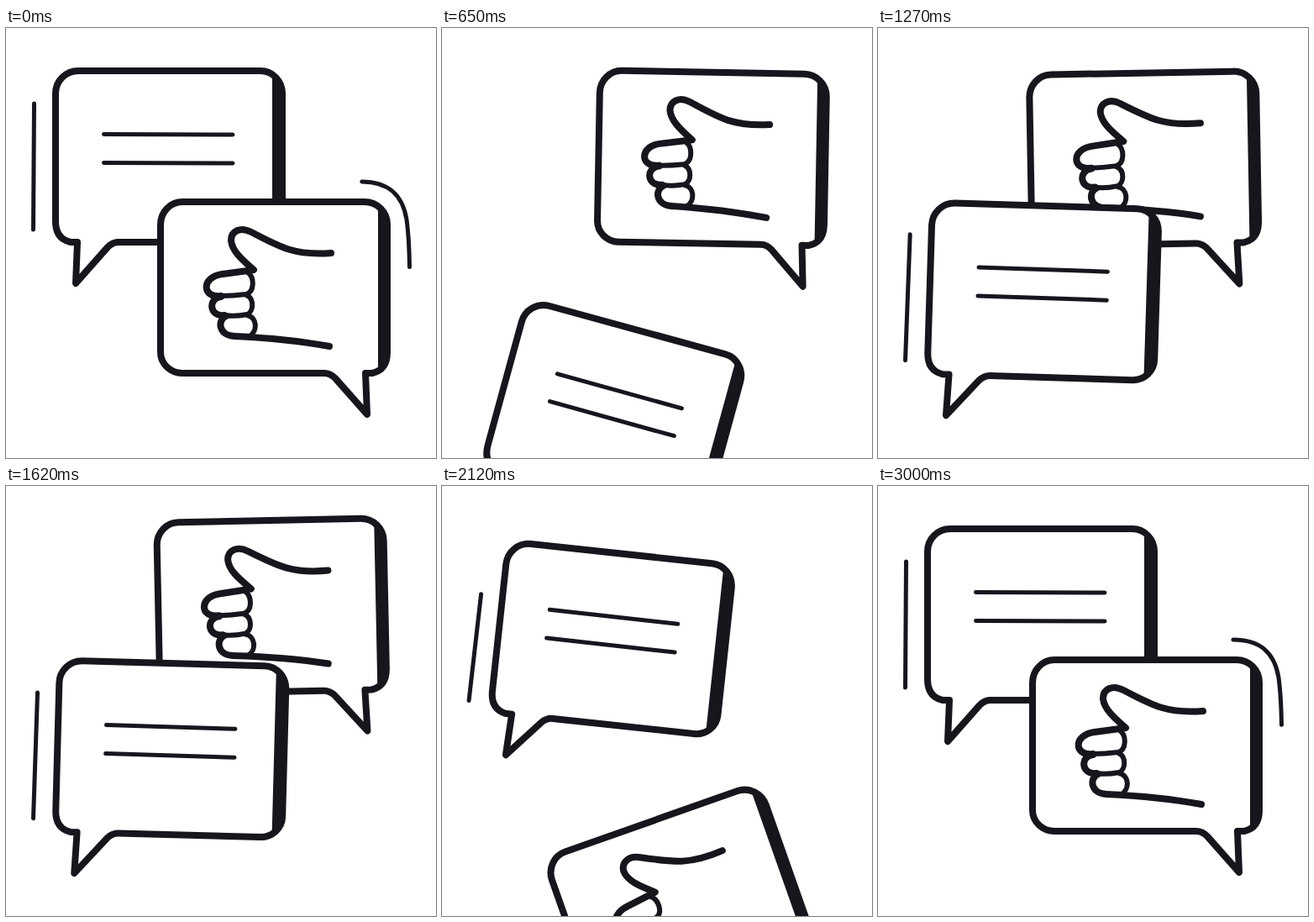
Write an HTML page that moves like this. It is 512 px wide and 512 px high and loops after 3020 ms.

```html
<!DOCTYPE html>
<html lang="en">
<head>
<meta charset="utf-8">
<title>Chat bubbles</title>
<style>
  html, body { margin: 0; width: 100%; height: 100%; overflow: hidden; background: #fff; }
  svg { display: block; width: 100vw; height: 100vh; }
  .ink { fill: none; stroke: #17161d; stroke-width: 8; stroke-linecap: round; stroke-linejoin: round; }
  .thin { stroke-width: 5; }
  .mid { stroke-width: 6; }
  .paper { fill: #fff; }
  .solid { fill: #17161d; }
</style>
</head>
<body>
<svg viewBox="0 0 512 512">
  <defs>
    <path id="outline" class="ink paper" d="M59 78A27 27 0 0 1 86 51H303A26 27 0 0 1 329 78V230A26 25 0 0 1 303 255H134Q127 255 121 261L83 304L85 255H77Q59 251 59 230Z"/>
    <path id="shade" class="solid" d="M317 55Q329 62 329 80V232Q328 248 317 254Z"/>
  </defs>
  <g id="stage">
    <g id="text">
      <use href="#outline"/>
      <use href="#shade"/>
      <path class="ink thin" d="M116.5 126.5L270 127M116.5 160.5L270 161"/>
      <path class="ink thin mark" pathLength="180" d="M32.3 270L33.5 90"/>
    </g>
    <g id="thumb">
      <use href="#outline" transform="translate(513) scale(-1 1)"/>
      <use href="#shade" x="126"/>
      <g transform="translate(0 -156)">
        <path class="ink" d="M387 268C345 271 328 262 292 243C279 236 268 242 268 253C269 265 280 275 295 288L258 293C232 296 233 322 256 319"/>
        <path class="ink" d="M256 320C240 322 242 344 260 342M262 343C252 347 252 366 272 367Q335 370 385 379"/>
        <path class="ink mid" d="M288 291C296 297 296 314 286 317Q270 319 256 319M286 318C296 322 295 338 287 341Q272 344 260 342M287 342C299 344 300 361 290 367"/>
      </g>
      <path class="ink thin mark" pathLength="192" d="M480.5 185V128Q480 94 477 72C472 42 455 27 423 27"/>
    </g>
  </g>
</svg>
<script>
const LOOP = 3020, HALF = LOOP / 2, DROP = 156, SWAP = 440;
const stage = document.getElementById('stage');

const makeBubble = (id, side, px, py, length, tail, drift) => {
  const node = document.getElementById(id);
  return { node, mark: node.querySelector('.mark'), side, px, py, length, tail, drift };
};
const text = makeBubble('text', 1, 40, 240, 180, 30, -0.06);
const thumb = makeBubble('thumb', -1, 460, 284, 192, 57, 0);

const progress = (u, a, b) => Math.min(1, Math.max(0, (u - a) / (b - a)));
const sine = p => (1 - Math.cos(Math.PI * p)) / 2;

// Smooth swing through [time, value] pairs.
function swing(u, keys) {
  for (let i = 1; i < keys.length; i++) {
    const [t0, v0] = keys[i - 1], [t1, v1] = keys[i];
    if (u < t1) return v0 + (v1 - v0) * sine(progress(u, t0, t1));
  }
  return keys[keys.length - 1][1];
}

const LIFT_TILT = [[60, 0], [330, 18], [505, 18], [735, -9], [1070, 2.5], [1430, 0]];
const ENTER_TILT = [[440, 22], [570, 21], [850, -8.5], [1170, 2.5], [1450, 0]];

// From the lower seat to the upper one.
const lift = u => ({
  y: DROP * (1 - sine(progress(u, 155, 710))),
  tilt: swing(u, LIFT_TILT),
  extra: 0
});

// Out through the top, then back in from below.
function cycle(u) {
  if (u < SWAP) {
    const p = u / 310;
    return { y: -153 * p ** 2.4, tilt: 9.35 * p * p, extra: 0 };
  }
  const extra = 350 * (1 - progress(u, 400, 1160)) ** 3;
  return { y: DROP + extra, tilt: swing(u, ENTER_TILT), extra };
}

function place(b, pose, k) {
  b.node.setAttribute('transform',
    `translate(${b.drift * pose.extra} ${pose.y}) rotate(${b.side * pose.tilt} ${b.px} ${b.py})`);
  b.mark.style.display = k > 0.01 ? '' : 'none';
  b.mark.setAttribute('stroke-dasharray', `${(b.length - b.tail) * k} 999`);
  b.mark.setAttribute('stroke-dashoffset', -b.tail * k);
}

function draw(time) {
  const t = time % LOOP, second = t >= HALF, u = t % HALF;
  const appear = 1 - (1 - progress(u, 860, 1200)) ** 2;
  if (second) {
    place(text, lift(u), 1 - 0.33 * Math.sin(Math.PI * progress(u, 320, 700)) ** 2);
    place(thumb, cycle(u), appear);
  } else {
    place(text, cycle(u), u < SWAP ? 1 : appear);
    place(thumb, lift(u), 1 - progress(u, 0, 250));
  }
  const front = second === (u < SWAP) ? text : thumb;
  if (stage.lastElementChild !== front.node) stage.append(front.node);
}

const start = performance.now();
function tick() {
  draw(performance.now() - start);
  requestAnimationFrame(tick);
}
draw(0);
requestAnimationFrame(tick);
</script>
</body>
</html>
```
